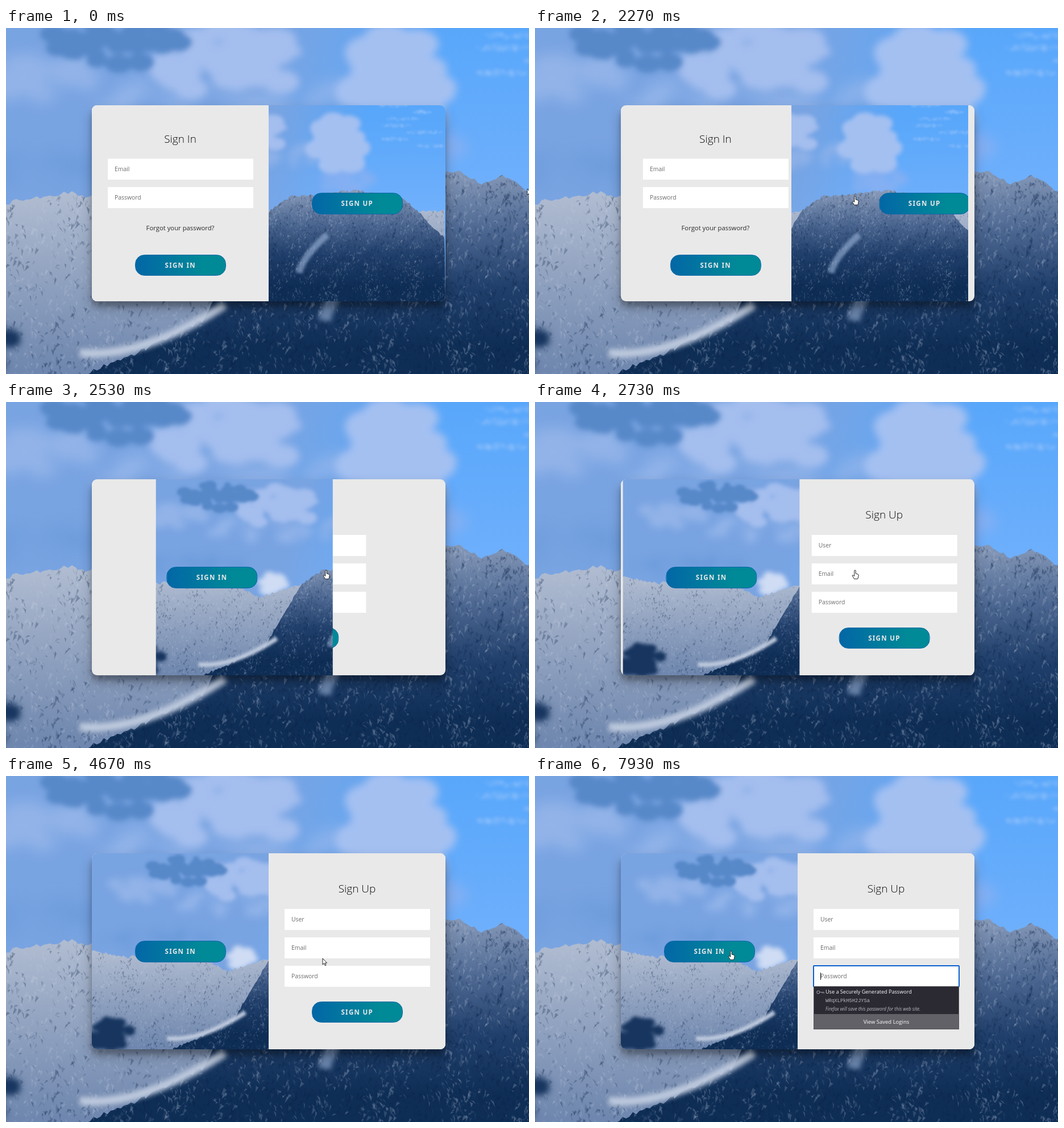
These frames come from a looping animation (920 px wide and 609 px high, 8000 ms). An HTML page with a canvas:

```html
<!DOCTYPE html>
<html lang="en">
<head>
<meta charset="utf-8">
<title>Sign in and sign up</title>
<style>
html, body { margin: 0; width: 100%; height: 100%; overflow: hidden; background: #60acfc; }
#stage { position: absolute; width: 920px; height: 609px; overflow: hidden; font: 10.4px "Open Sans", sans-serif; color: #2a2a2a; }
#stage div, canvas, #cursor { position: absolute; box-sizing: border-box; }
#backdrop { left: -115px; top: -31px; }
#card { left: 151px; top: 136px; width: 622px; height: 345px; overflow: hidden; isolation: isolate; border-radius: 9px; background: #e9e9e9;
  box-shadow: 0 12px 22px rgba(0,0,0,.25), 0 9px 9px rgba(0,0,0,.22); }
.form, .panel, #window { top: 0; width: 311px; height: 345px; }
.form { left: 0; background: #e9e9e9; }
.title, .forgot { left: 0; width: 100%; text-align: center; line-height: 30px; }
.title { font-size: 19px; font-weight: 300; color: #0c0c0c; }
.forgot { font-size: 11.3px; }
.field { left: 28px; width: 256px; height: 37px; padding-left: 12px; line-height: 37px; background: #fff; color: #6c6c6c; }
.field.focus { outline: 2px solid #0a60d0; outline-offset: -1px; border-radius: 1px; }
.field.focus::before { content: ""; position: absolute; left: 12px; top: 12px; width: 1px; height: 13px; background: #222; }
.button { left: 75.5px; width: 160.5px; height: 37.5px; border: 1px solid #0367a6; border-radius: 16.4px; color: #e9e9e9;
  background: linear-gradient(90deg, #0367a6 0%, #008997 74%); text-align: center; white-space: pre;
  font: bold 11.5px/35px "Noto Sans", sans-serif; letter-spacing: 1.31px; }
#window { left: 311px; overflow: hidden; z-index: 5; }
#overlay { left: -311px; width: 622px; height: 345px; }
#overlay canvas { left: 0; top: 0; width: 622px; height: 345.6px; }
#overlay .button { top: 154px; }
#popup { left: 490px; top: 370px; width: 256px; height: 76px; background: #2b2a33; border: 1px solid #55545c; color: #fbfbfe; white-space: pre; }
#popup div { left: 20px; line-height: 14px; }
#popup svg { position: absolute; left: 4px; top: 5px; }
#popup .saved { left: 0; top: 48px; width: 254px; height: 26px; background: #626167; line-height: 27px; text-align: center; font-size: 9.5px; }
#cursor { left: 0; top: 0; overflow: visible; }
</style>
</head>
<body>
<div id="stage">
  <canvas id="backdrop" width="1152" height="640"></canvas>
  <div id="card">
    <div class="form" id="signIn">
      <div class="title" style="top:44px">Sign In</div>
      <div class="field" style="top:94px">Email</div>
      <div class="field" style="top:144px">Password</div>
      <div class="forgot" style="top:201px">Forgot your password?</div>
      <div class="button" style="top:262.5px">SIGN IN</div>
    </div>
    <div class="form" id="signUp">
      <div class="title" style="top:47px">Sign Up</div>
      <div class="field" id="user" style="top:97.5px">User</div>
      <div class="field" id="email" style="top:147.5px">Email</div>
      <div class="field" id="password" style="top:197.5px">Password</div>
      <div class="button" style="top:260.5px">SIGN UP</div>
    </div>
    <div id="window">
      <div id="overlay">
        <canvas id="picture" width="1152" height="640"></canvas>
        <div class="panel" id="leftPanel" style="left:0"><div class="button">SIGN IN</div></div>
        <div class="panel" id="rightPanel" style="left:311px"><div class="button" id="toSignUp">SIGN UP</div></div>
      </div>
    </div>
  </div>
  <div id="popup">
    <svg width="14" height="10" fill="none" stroke="#8f8f9d" stroke-width="1.2"><circle cx="3.2" cy="4.5" r="2.5"/><path d="M6 4.5h7v2.5M10 4.5v2"/></svg>
    <div style="top:2px;font-size:9.1px">Use a Securely Generated Password</div>
    <div style="top:18px;font:8.67px/14px 'Liberation Mono',monospace;color:#b9b9c0">WRqXLPkH5H2JYSa</div>
    <div style="top:32px;font-size:8.1px;font-style:italic;color:#b9b9c0">Firefox will save this password for this web site.</div>
    <div class="saved">View Saved Logins</div>
  </div>
  <svg id="cursor" width="1" height="1" fill="#fff" stroke="#111" stroke-width=".9" stroke-linejoin="round">
    <path id="arrow" d="M0 0V11L2.6 8.6 4.4 12.7 6 12 4.3 8H7.6Z"/>
    <path id="hand" d="M-1.2 9V1.2a1.2 1.2 0 0 1 2.4 0V6l4 1.2q1.2.4 1 1.8l-.7 4-.9 2.4H-1.5L-4.7 10q-.4-1.5 1.2-1.2L-1.2 10.3Z"/>
    <path id="beam" fill="none" d="M-2.5-5.5H2.5M0-5.5V5.5M-2.5 5.5H2.5"/>
  </svg>
</div>
<script>
const $ = id => document.getElementById(id);

// Landscape
const LEFT = -115, TOP = -31, RIGHT = 1037, BOTTOM = 609;
const ctx = $('backdrop').getContext('2d');
ctx.translate(-LEFT, -TOP);

let seed = 7;
const random = () => (seed = seed * 16807 % 2147483647) / 2147483647;
const between = (a, b) => a + random() * (b - a);

function fade(x0, y0, x1, y1, ...colors) {
  const g = ctx.createLinearGradient(x0, y0, x1, y1);
  colors.forEach((c, i) => g.addColorStop(i / (colors.length - 1), c));
  return g;
}

// A cluster of soft puffs within an ellipse.
function cloud(x, y, rx, ry, color, blur = 7) {
  const path = new Path2D();
  for (let i = 0; i < 45; i++) {
    const angle = between(0, 2 * Math.PI), r = Math.sqrt(random()), size = ry * between(.15, .4);
    const px = x + Math.cos(angle) * r * rx, py = y + Math.sin(angle) * r * ry;
    path.moveTo(px + size * 1.5, py);
    path.ellipse(px, py, size * 1.5, size, 0, 0, 2 * Math.PI);
  }
  ctx.filter = `blur(${blur}px)`;
  ctx.fillStyle = color;
  ctx.fill(path);
  ctx.filter = 'none';
}

function snow(curve, width, color) {
  ctx.filter = 'blur(4px)';
  ctx.lineWidth = width;
  ctx.strokeStyle = color;
  ctx.stroke(new Path2D(curve));
  ctx.filter = 'none';
}

// A jagged ridge through a few summits, covered with fine slanted facets.
function mountain(summits, fill, lit, count) {
  const face = new Path2D(`M${summits[0][0]} ${BOTTOM}`);
  summits.slice(1).forEach(([x1, y1], i) => {
    const [x0, y0] = summits[i];
    for (let x = x0; x < x1; x += 6) face.lineTo(x, y0 + (y1 - y0) * (x - x0) / (x1 - x0) + between(-4, 4));
  });
  face.lineTo(RIGHT, BOTTOM);
  ctx.save();
  ctx.clip(face);
  ctx.fillStyle = fill;
  ctx.fillRect(LEFT, TOP, RIGHT - LEFT, BOTTOM - TOP);
  for (let i = 0; i < count; i++) {
    const x = between(summits[0][0], RIGHT), y = between(240, BOTTOM);
    const rib = Math.sin(x * .06 + y * .03 + 2 * Math.sin(y * .025 + x * .01));
    const w = between(2, 6), h = between(3, 15), lean = between(-5, 9);
    ctx.fillStyle = random() < lit + .35 * rib
      ? `rgba(198,207,224,${between(.05, .27)})` : `rgba(10,34,70,${between(.06, .32)})`;
    ctx.beginPath();
    ctx.moveTo(x, y);
    ctx.lineTo(x + w, y + h * .3);
    ctx.lineTo(x + lean, y + h);
    ctx.fill();
  }
  ctx.restore();
}

function paintSky() {
  const width = RIGHT - LEFT, height = BOTTOM - TOP;
  for (const tint of [fade(0, 0, 0, 330, '#58a7fb', '#72b1fc'),
                      fade(480, 0, 760, 90, '#79a4e2', 'rgba(121,164,226,0)')]) {
    ctx.fillStyle = tint;
    ctx.fillRect(LEFT, TOP, width, height);
  }
  cloud(50, 85, 110, 40, '#92b3e8', 12);
  cloud(400, 130, 260, 35, '#94b5ea', 14);
  cloud(390, 60, 125, 60, '#a4beee');
  cloud(715, 210, 80, 45, 'rgba(140,177,240,.8)', 12);
  cloud(690, 95, 72, 78, '#a4c0f1');
  cloud(190, 22, 120, 42, '#5788c8', 5);
  cloud(100, 250, 180, 28, 'rgba(103,151,215,.7)', 14);
  cloud(370, 310, 38, 34, '#cfdcf4', 8);
  for (let i = 0; i < 7; i++) cloud(between(840, 1020), TOP + i * 22, between(30, 60), 5, 'rgba(176,207,252,.7)', 3);
}

paintSky();
mountain([[LEFT, 287], [0, 308], [110, 289], [254, 318], [328, 352], [463, 313], [RIGHT, 313]],
  fade(0, 290, 0, 600, '#b0bcd1', '#8fa1bf', '#6f87ae'), .55, 5500);
cloud(-60, 560, 70, 50, '#17355f', 6);
mountain([[130, 612], [245, 566], [345, 515], [463, 313], [531, 267], [754, 245], [800, 255], [838, 275], [873, 260], [920, 288], [RIGHT, 405]],
  fade(0, 250, 0, 560, '#879ab9', '#4d6892', '#203f6b', '#0f2e56'), .38, 7500);
snow('M130 572Q240 582 385 487', 15, '#bdc9dd');
snow('M560 515Q570 465 652 390', 22, 'rgba(150,174,211,.65)');
$('picture').getContext('2d').drawImage($('backdrop'), 0, 0);

// Motion
const LOOP = 8000, SLIDE = 2194, HALF = 311;
const clamp = x => Math.min(1, Math.max(0, x));
const shift = (node, x) => node.style.transform = `translateX(${x}px)`;

// cubic-bezier(.42, 0, .58, 1)
function easeInOut(x) {
  if (x <= 0 || x >= 1) return clamp(x);
  let lo = 0, hi = 1, s;
  for (let i = 0; i < 24; i++) {
    s = (lo + hi) / 2;
    const at = 1.26 * s * (1 - s) ** 2 + 1.74 * s * s * (1 - s) + s ** 3;
    if (at < x) lo = s; else hi = s;
  }
  return s * s * (3 - 2 * s);
}

// The pointer rests between moves and changes shape halfway through one.
const moves = [
  { from: 0, to: 1, x: 917, y: 283, shape: 'arrow' },
  { from: 70, to: 71, x: 843, y: 37, shape: 'arrow' },
  { from: 600, to: 800, x: 524, y: 284, shape: 'arrow' },
  { from: 1210, to: 1670, x: 563, y: 296, shape: 'hand' },
  { from: 2940, to: 3130, x: 545, y: 254, shape: 'beam' },
  { from: 4010, to: 4400, x: 557, y: 321, shape: 'arrow' },
  { from: 5070, to: 5330, x: 560, y: 310, shape: 'beam' },
  { from: 5740, to: 6130, x: 564, y: 346, shape: 'beam' },
  { from: 6810, to: 7470, x: 400, y: 390, shape: 'arrow' },
  { from: 7740, to: 7930, x: 345, y: 308, shape: 'hand' }
];

function drawCursor(t) {
  let { x, y, shape } = moves[0];
  for (const move of moves) {
    const k = clamp((t - move.from) / (move.to - move.from));
    x += (move.x - x) * k;
    y += (move.y - y) * k;
    if (k > .5) shape = move.shape;
  }
  const away = t >= 70 && t < 600;
  $('cursor').style.transform = `translate(${x}px, ${y}px)`;
  for (const id of ['arrow', 'hand', 'beam']) $(id).style.display = id === shape && !away ? '' : 'none';
}

function draw(t) {
  const progress = (t - SLIDE) / 580, started = progress >= 0;
  const slide = easeInOut(progress) * HALF;
  shift($('signIn'), slide);
  shift($('signUp'), slide);
  $('signIn').style.zIndex = progress < .5 ? 2 : 1;
  $('signUp').style.zIndex = progress < .5 ? 1 : 2;
  shift($('window'), -slide);
  shift($('overlay'), easeInOut((t - SLIDE) / 480) * HALF);
  shift($('leftPanel'), started ? 0 : -HALF / 5);
  shift($('rightPanel'), started ? HALF / 5 : 0);
  const press = clamp((t - 1960) / 80) - clamp((t - 2140) / 80);
  $('toSignUp').style.transform = `scale(${1 - .05 * press})`;

  const focus = (id, from, to) => $(id).classList.toggle('focus', t >= from && t < to);
  focus('user', 3600, 4670);
  focus('email', 5530, 6400);
  focus('password', 6400, LOOP);
  $('popup').style.display = t >= 6470 ? '' : 'none';
  drawCursor(t);
}

const start = performance.now();
function tick() {
  draw((performance.now() - start) % LOOP);
  requestAnimationFrame(tick);
}
tick();
</script>
</body>
</html>
```
